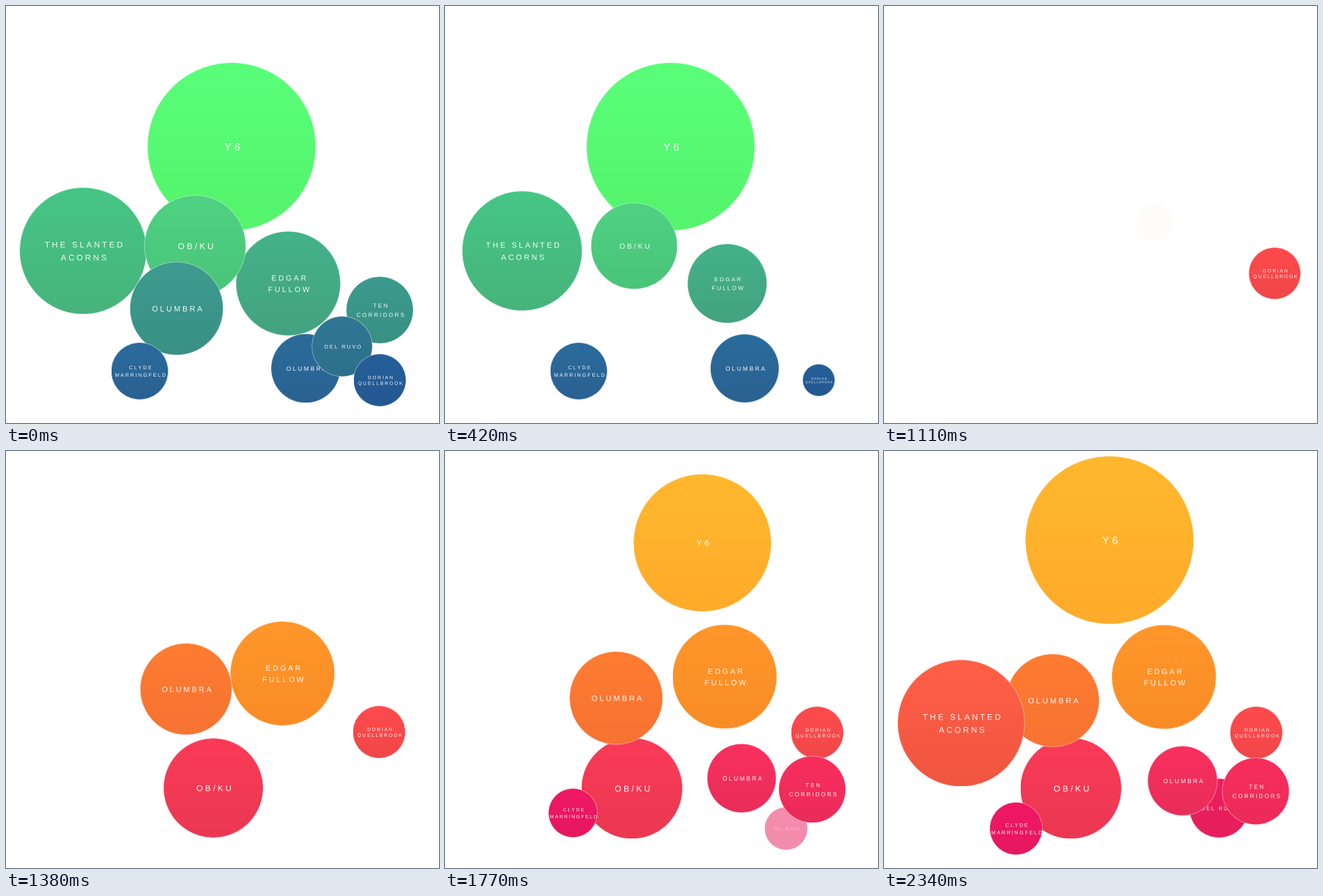
A matplotlib script for the animation above (2.37 s loop, 570 by 550 pixels).

```python
import numpy as np
import matplotlib.pyplot as plt
from matplotlib.animation import FuncAnimation
from matplotlib.colors import to_rgb
from matplotlib.patches import PathPatch
from matplotlib.path import Path
from matplotlib.textpath import TextPath
from matplotlib.transforms import Affine2D

W, H, DPI = 570, 550, 100
STEP, FRAMES = 30, 79
SHRINK, GROW, FADE = 270, 300, 130   # ms
BLANK = 720
TRACKING = 0.27                      # em between letters
EM = 100
FONT = {"family": "Liberation Sans"}

# label lines, text size, line height
LABELS = {
    "y6": (["Y6"], 14, 0),
    "acorns": (["THE SLANTED", "ACORNS"], 10.7, 17),
    "ob": (["OB/KU"], 11.2, 0),
    "edgar": (["EDGAR", "FULLOW"], 9.9, 15),
    "olumbra": (["OLUMBRA"], 10.1, 0),
    "olumbra small": (["OLUMBRA"], 8, 0),
    "ten": (["TEN", "CORRIDORS"], 7.6, 12.2),
    "del": (["DEL RUVO"], 6.9, 0),
    "clyde": (["CLYDE", "MARRINGFELD"], 6.7, 9.8),
    "dorian": (["DORIAN", "QUELLBROOK"], 6.3, 7.6),
}

# label, x, y, radius, top colour, bottom colour, shrink start
COOL = [
    ("y6", 297, 185.5, 110.7, "#5aff79", "#54f46c", 450),
    ("acorns", 101.5, 323, 83.5, "#47c686", "#46b47c", 317),
    ("edgar", 371.5, 366, 68.7, "#43b28b", "#43a380", 252),
    ("ob", 249, 316.5, 66.7, "#4fd283", "#4ac479", 277),
    ("olumbra", 224.5, 399, 61.3, "#3e9b8f", "#3a9085", 135),
    ("clyde", 176, 481.5, 37.5, "#2b6c9c", "#2a6192", 408),
    ("ten", 492, 401, 44, "#3b9b8e", "#389083", 90),
    ("olumbra small", 394.5, 478, 45.5, "#2b6c9b", "#2a6292", 364),
    ("del", 442.5, 449, 39.7, "#307894", "#2e708b", 45),
    ("dorian", 492, 493.5, 34.5, "#255f9a", "#245891", 223),
]

# label, x, y, radius, top, bottom, grow start, drift time, drift x, drift y
WARM = [
    ("y6", 296.5, 117.5, 110.7, "#ffb82e", "#ffab2b", 1640, 840, 70, 6),
    ("edgar", 368.5, 298, 68.6, "#ff972b", "#fa8c26", 1070, 1000, -14, -14),
    ("ob", 246, 445, 66.5, "#fa3b58", "#eb3852", 1154, 650, 97, -2),
    ("olumbra", 222, 329, 61.2, "#ff7c32", "#f67332", 1154, 1200, 28, -28),
    ("acorns", 101.5, 359, 83.5, "#ff5f46", "#f05641", 1758, 520, -50, -35),
    ("del", 441, 471, 39, "#ee1e5f", "#e41e5c", 1666, 470, 17, 57),
    ("dorian", 490, 371.5, 34.5, "#ff4b4e", "#f04748", 880, 650, 90, -70),
    ("olumbra small", 393, 435, 45.8, "#fa305f", "#e82d59", 1535, 500, -17, -23),
    ("ten", 489.3, 448.7, 44, "#f82e5c", "#eb2b5a", 1420, 650, -60, -23),
    ("clyde", 173.8, 498, 34.6, "#f01964", "#e6175f", 1593, 840, -11, -42),
]


def ink(text):
    return TextPath((0, 0), text, size=EM, prop=FONT).get_extents()


CAP = ink("H").height
HH = ink("HH").width
ADVANCE = {c: ink(f"H{c}H").width - HH
           for c in sorted(set("".join("".join(v[0]) for v in LABELS.values())))}


def tracked(line, mid):
    """One letterspaced line, centred on x = 0 and on height mid, in em units."""
    gap = TRACKING * EM
    x = -(sum(ADVANCE[c] for c in line) + gap * (len(line) - 1)) / 2
    glyphs = []
    for c in line:
        if c != " ":
            glyphs.append(TextPath((x, mid), c, size=EM, prop=FONT))
        x += ADVANCE[c] + gap
    return glyphs


def label_path(key, radius):
    """Label as a path in units of the ball's radius, y pointing down."""
    lines, size, leading = LABELS[key]
    k = size / EM
    glyphs = []
    for i, line in enumerate(lines):
        down = (i - (len(lines) - 1) / 2) * leading / k
        glyphs += tracked(line, -down - CAP / 2)
    flip = Affine2D().scale(k, -k).translate(0.8, 0.3).scale(1 / radius)
    return Path.make_compound_path(*glyphs).transformed(flip)


class Ball:
    def __init__(self, ax, z, key, x, y, r, top, bottom):
        self.x, self.y, self.r = x, y, r
        self.place = Affine2D()
        trans = self.place + ax.transData
        mix = np.linspace(0, 1, 64)[:, None, None]
        shade = (1 - mix) * np.array(to_rgb(top)) + mix * np.array(to_rgb(bottom))
        self.fill = ax.imshow(shade, extent=(-1, 1, 1, -1), transform=trans,
                              aspect="auto", interpolation="nearest", zorder=z)
        self.fill.set_clip_path(Path.unit_circle(), trans)
        self.rim = PathPatch(Path.unit_circle(), fc="none", ec="white",
                             lw=0.65, transform=trans, zorder=z)
        self.text = PathPatch(label_path(key, r), fc="white", lw=0,
                              transform=trans, zorder=z)
        ax.add_patch(self.rim)
        ax.add_patch(self.text)

    def show(self, scale, alpha=1.0, dx=0.0, dy=0.0):
        visible = scale > 0.02 and alpha > 0.005
        for part, opacity in ((self.fill, 1), (self.rim, 0.4), (self.text, 0.95)):
            part.set_visible(visible)
            part.set_alpha(opacity * alpha)
        if visible:
            self.place.clear().scale(self.r * scale)
            self.place.translate(self.x + dx, self.y + dy)


def progress(t, start, span):
    return min(max((t - start) / span, 0), 1)


fig = plt.figure(figsize=(W / DPI, H / DPI), dpi=DPI, facecolor="white")
ax = fig.add_axes([0, 0, 1, 1])
ax.set_xlim(0, W)
ax.set_ylim(H, 0)
ax.axis("off")

cool = [(Ball(ax, z, *row[:6]), row[6]) for z, row in enumerate(COOL, 1)]
warm = [(Ball(ax, z, *row[:6]), row[6:]) for z, row in enumerate(WARM, 20)]


def update(i):
    t = i * STEP
    for ball, start in cool:
        ball.show(1 - progress(t, start, SHRINK) ** 3 if t < BLANK else 0)
    for ball, (start, span, dx, dy) in warm:
        scale = 1 - (1 - progress(t, start, GROW)) ** 3
        alpha = progress(t, start, FADE) ** 3
        left = (1 - progress(t, start, span)) ** 3
        ball.show(scale, alpha, dx * left, dy * left)
    return []


anim = FuncAnimation(fig, update, frames=FRAMES, interval=STEP,
                     repeat=True, repeat_delay=0, blit=False)
plt.show()
```
